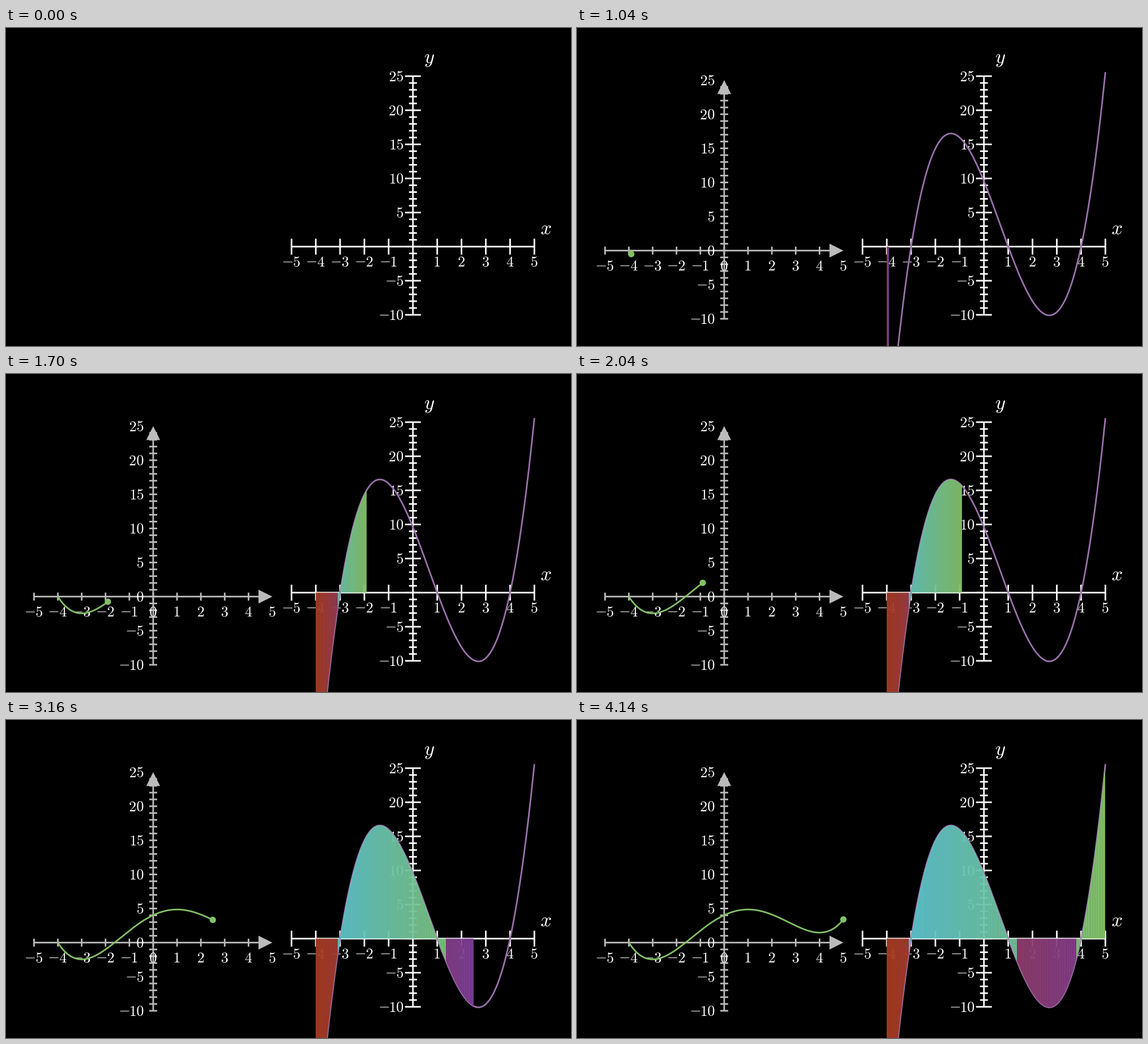
These frames come from a looping animation (998x561 px, 5 s). A matplotlib script:

```python
import numpy as np
import matplotlib.pyplot as plt
from matplotlib.animation import FuncAnimation
from matplotlib.collections import LineCollection, PolyCollection
from matplotlib.patches import Circle, PathPatch, Polygon
from matplotlib.path import Path
from matplotlib.textpath import TextPath
from matplotlib.transforms import Affine2D

plt.rcParams["mathtext.fontset"] = "cm"

W, H, DPI = 998, 561, 64
STEP_MS, LOOP_MS = 20, 5000
PT = 72 / DPI                 # points per pixel
UNIT = W * 9 / 128            # pixels per scene unit
STROKE = 0.04 * UNIT * PT
DX = 0.05
WHITE, GRAY, GREEN, PURPLE = "#ffffff", "#bbbbbb", "#83c167", "#9a72ac"
COOL = np.array([88, 196, 221]) / 255
WARM = np.array([131, 193, 103]) / 255

# right and left coordinate systems, in pixels
RX, RY, RU = 718.8, 385.7, 42.9
LX, LY, LU = 260.0, 392.7, 42.1
VU = 6 / 35 * UNIT
AREA_SCALE = VU / UNIT        # area is measured in scene height units

NUM_SIZE, NAME_SIZE = 26.2, 35
NUM_GAP = 0.25 * UNIT         # axis to number
DIGIT_GAP = 0.036 * UNIT      # between the glyphs of a number

fig = plt.figure(figsize=(W / DPI, H / DPI), dpi=DPI, facecolor="black")
ax = fig.add_axes([0, 0, 1, 1])
ax.set_xlim(0, W)
ax.set_ylim(H, 0)
ax.axis("off")


def f(x):
    return 0.8 * (x + 3) * (x - 1) * (x - 4)


def antiderivative(x):
    return 0.8 * (x**4 / 4 - 2 * x**3 / 3 - 5.5 * x**2 + 12 * x)


def area(x):
    return (antiderivative(x) - antiderivative(-4.0)) * AREA_SCALE


def smooth(t):
    t = np.clip(t, 0, 1)
    edge = 1 / (1 + np.exp(5))
    return (1 / (1 + np.exp(-10 * (t - 0.5))) - edge) / (1 - 2 * edge)


def glyph(text, size):
    """Outline in pixels with the ink's lower left corner at the origin."""
    path = TextPath((0, 0), f"${text}$", size=size)
    box = path.get_extents()
    path = Affine2D().translate(-box.x0, -box.y0).transform_path(path)
    return path, box.width, box.height


def number(value):
    """Digits set side by side, with the minus hung from their middle."""
    parts, x, height = [], 0, 0
    for char in str(abs(value)):
        path, width, height = glyph(char, NUM_SIZE)
        parts.append(Affine2D().translate(x, 0).transform_path(path))
        x += width + DIGIT_GAP
    if value < 0:
        path, width, thick = glyph("-", NUM_SIZE)
        move = Affine2D().translate(-width - DIGIT_GAP, height / 2 - thick)
        parts.append(move.transform_path(path))
    return Path.make_compound_path(*parts)


def place(path, x, y, across="center", down="center"):
    box = path.get_extents()
    ax_x = box.x1 if across == "right" else (box.x0 + box.x1) / 2
    ax_y = box.y1 if down == "top" else (box.y0 + box.y1) / 2
    move = Affine2D().translate(-ax_x, -ax_y).scale(1, -1).translate(x, y)
    return move.transform_path(path)


def numbers(x0, y0, unit, zero):
    xs = [i for i in range(-5, 6) if i or zero]
    ys = [i for i in range(-10, 26, 5) if i or zero]
    return ([place(number(i), x0 + i * unit, y0 + NUM_GAP, down="top") for i in xs]
            + [place(number(i), x0 - NUM_GAP, y0 - i * VU, across="right")
               for i in ys])


def add_labels(paths):
    shape = Path.make_compound_path(*paths)
    return ax.add_patch(PathPatch(shape, fc=WHITE, lw=0, zorder=2))


def add_lines(segments, color):
    lines = LineCollection(segments, colors=color, linewidths=STROKE,
                           capstyle="butt", zorder=1)
    lines.set_snap(False)
    return ax.add_collection(lines)


def x_tick(x, y, half):
    return [(x, y - half), (x, y + half)]


def y_tick(x, y, half):
    return [(x - half, y), (x + half, y)]


def right_axes():
    lines = [[(RX - 5 * RU, RY), (RX + 5 * RU, RY)],
             [(RX, RY + 10 * VU), (RX, RY - 25 * VU)]]
    lines += [x_tick(RX + i * RU, RY, 14) for i in range(-5, 6) if i]
    lines += [y_tick(RX, RY - i * VU, 7 if i % 5 else 14)
              for i in range(-10, 26)]
    add_lines(lines, WHITE)
    names = [place(glyph("x", NAME_SIZE)[0], 954, 356.2),
             place(glyph("y", NAME_SIZE)[0], 748, 57.5)]
    add_labels(numbers(RX, RY, RU, zero=False) + names)


def left_axes():
    tip, half = 24.5, 12.2
    end_x, end_y = LX + 5 * LU, LY - 25 * VU
    lines = [[(LX - 5 * LU, LY), (end_x - tip, LY)],
             [(LX, LY + 10 * VU), (LX, end_y + tip)]]
    lines += [x_tick(LX + i * LU, LY, 7) for i in range(-5, 5)]
    lines += [y_tick(LX, LY - i * VU, 7) for i in range(-10, 25)]
    parts = [add_lines(lines, GRAY)]
    for tri in ([(end_x, LY), (end_x - tip, LY - half), (end_x - tip, LY + half)],
                [(LX, end_y), (LX - half, end_y + tip), (LX + half, end_y + tip)]):
        parts.append(ax.add_patch(Polygon(tri, fc=GRAY, lw=0, zorder=1)))
    parts.append(add_labels(numbers(LX, LY, LU, zero=True)))
    return parts


right_axes()
left_parts = left_axes()
curve, = ax.plot([], [], color=PURPLE, lw=STROKE, solid_capstyle="butt", zorder=3)
bars = PolyCollection([], linewidths=0, antialiaseds=True, zorder=4)
bars.set_snap(False)
ax.add_collection(bars, autolim=False)
trail, = ax.plot([], [], color=GREEN, lw=STROKE, solid_capstyle="butt", zorder=5)
dot = ax.add_patch(Circle((0, 0), 0.08 * UNIT, fc=GREEN, lw=0, zorder=6))


def set_curve(t):
    x = np.linspace(-5, -5 + 10 * smooth(t), 300)
    curve.set_data(RX + x * RU, RY - f(x) * VU)


def set_bars(k):
    x = -4 + DX * np.arange(k + 1)
    edge = RX + x * RU
    px = np.round(edge)                       # whole pixels: no gaps between bars
    py = RY - f((px - RX) / RU) * VU
    base = np.full(k, RY)
    corners = ((px[:-1], base), (px[:-1], py[:-1]), (px[1:], py[1:]), (px[1:], base))
    bars.set_verts(np.stack([np.column_stack(c) for c in corners], 1))

    mix = np.linspace(0, 1, k)[:, None]
    colors = COOL + (WARM - COOL) * mix
    colors = np.where(f(x[:-1, None]) < -3.1, 1 - colors, colors)
    # faint stripes where neighbouring bars meet
    part = edge[:-1] * 2560 / W % 1
    alpha = 1 - 0.3 * part * (1 - part)
    bars.set_facecolor(np.column_stack([colors, alpha]))


def set_trail(k):
    x = -4 + DX * np.arange(k + 1)
    px, py = LX + x * LU, LY - area(x) * VU
    trail.set_data(px, py)
    dot.center = (px[-1], py[-1])


def update(frame):
    tick = round(frame * STEP_MS * 0.06)      # motion advances 60 times a second
    k = min(tick - 60, 180)
    shown = k >= 0
    for part in (*left_parts, trail, dot):
        part.set_visible(shown)
    bars.set_visible(k > 0)
    set_curve(tick / 60)
    if shown:
        set_trail(k)
    if k > 0:
        set_bars(k)
    return curve, bars, trail, dot, *left_parts


anim = FuncAnimation(fig, update, frames=LOOP_MS // STEP_MS, interval=STEP_MS,
                     init_func=lambda: update(0), repeat=True, repeat_delay=0)
plt.show()
```
